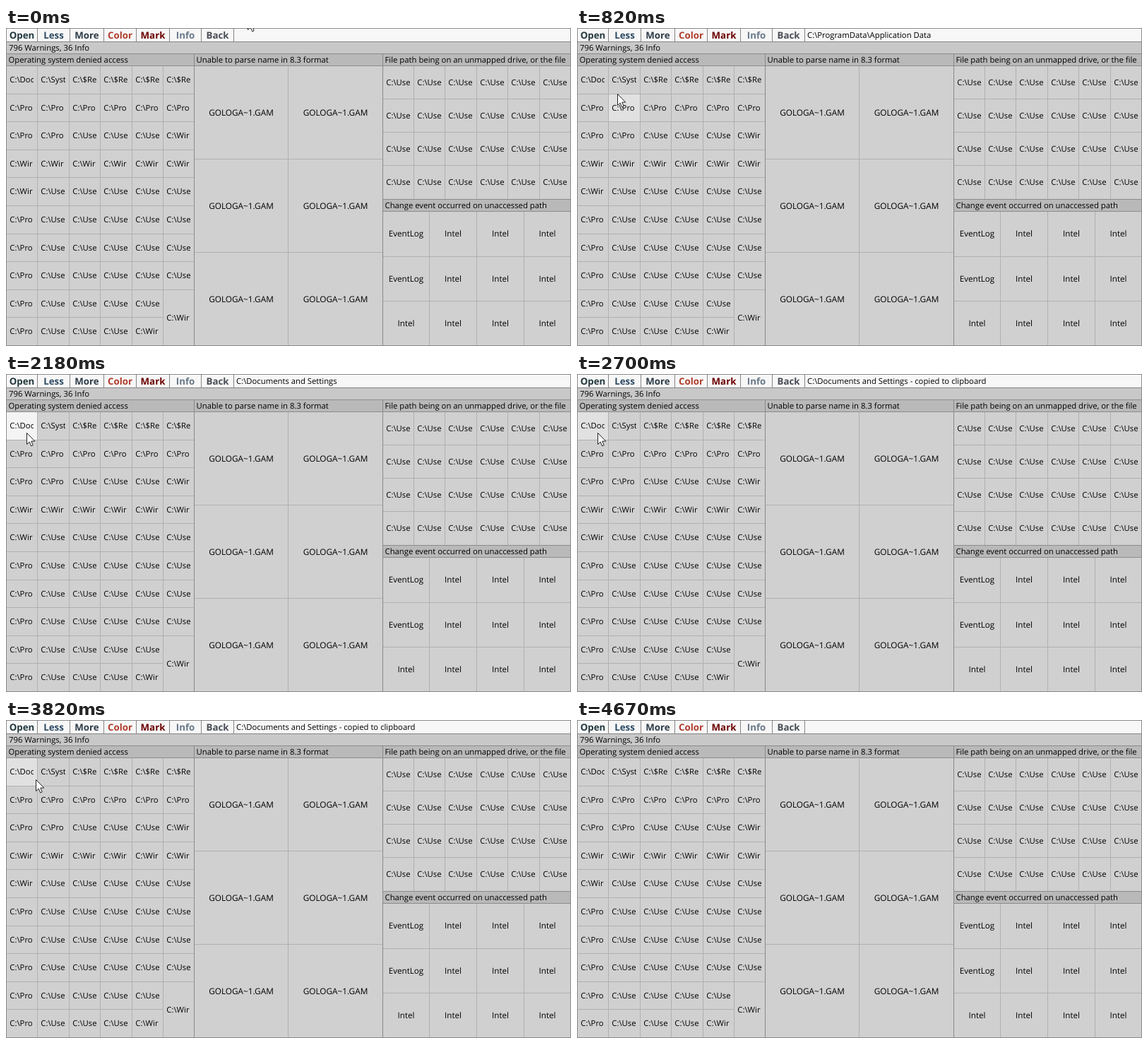
These frames come from a looping animation (800 px wide and 450 px high, 4730 ms). An HTML page:

```html
<!DOCTYPE html>
<html lang="en">
<head>
<meta charset="utf-8">
<title>Warnings map</title>
<style>
html, body { margin: 0; width: 100%; height: 100%; overflow: hidden; }
#stage {
  position: relative; width: 800px; height: 450px; overflow: hidden;
  background: #c8c8c8; color: #000;
  font: 11.3px "Open Sans", "Noto Sans", sans-serif;
  text-rendering: geometricPrecision; white-space: pre; cursor: none;
}
#stage div { position: absolute; box-sizing: border-box; overflow: hidden; }
#stage .frame { inset: 0; border: 1px solid #8a8a8a; }
.button, #status { background: #f7f7f7; }
.button { font-size: 13.3px; font-weight: 700; line-height: 18px; text-align: center; }
#status { left: 323px; top: 1px; width: 476px; height: 18px; padding-left: 3px; line-height: 19px; }
#bar { left: 0; top: 0; width: 800px; height: 20px; background: #858585; }
#count { left: 4px; top: 20px; line-height: 17px; }
.head { height: 18px; padding: 0 4px 0 3.5px; line-height: 17px; background: #b9b9b9; border: solid #8c8c8c; border-width: 1px 0; }
.head span { display: block; overflow: hidden; }
.panel { background: #b0b0b0; }
.cell { background: #d0d0d0; display: flex; align-items: center; justify-content: center; }
.cell.path span { position: absolute; left: 4.3px; right: 5px; overflow: hidden; }
.split { background: #8a8a8a; }
#arrow { position: absolute; left: 0; top: 0; overflow: visible; }
</style>
</head>
<body>
<div id="stage">
  <div id="bar"></div>
  <div id="status"></div>
  <div id="count">796 Warnings, 36 Info</div>
</div>
<script>
const LOOP = 4730, PRESS = 2100, RELEASE = 2350;
const stage = document.getElementById('stage');
const status = document.getElementById('status');

function box(cls, x, y, w, h, text, size) {
  const el = document.createElement('div');
  el.className = cls;
  Object.assign(el.style, { left: x + 'px', top: y + 'px', width: w + 'px', height: h + 'px' });
  if (size) el.style.fontSize = size + 'px';
  if (text) el.appendChild(document.createElement('span')).textContent = text;
  return stage.appendChild(el);
}

// Grid of cells separated by one-pixel lines; label returns [text, row span].
function panel(x0, y0, x1, y1, cols, rows, cls, size, label) {
  const px = c => Math.floor(x0 + (x1 - x0) * c / cols);
  const py = r => Math.floor(y0 + (y1 - y0) * r / rows);
  const cells = [];
  box('panel', px(0), py(0), px(cols) - px(0), py(rows) - py(0));
  for (let r = 0; r < rows; r++) for (let c = 0; c < cols; c++) {
    const [text, span = 1] = label(r, c);
    if (!text) continue;
    const x = px(c) + 1, y = py(r) + 1, right = px(c + 1), bottom = py(r + span);
    const el = box(cls, x, y, right - x, bottom - y, text, size);
    cells.push({ el, r, c, x, y, right, bottom });
  }
  return cells;
}

const head = (x, y, w, text) => box('head', x, y, w, 18, text);

// Toolbar
const edges = [0, 44, 90, 138, 184, 231, 276, 322];
[['Open', '#22383e'], ['Less', '#2c4a63'], ['More', '#2e3c48'], ['Color', '#b03c2c'],
 ['Mark', '#6c0000'], ['Info', '#687888'], ['Back', '#484c54']].forEach(([name, color], i) => {
  const el = box('button', edges[i] + 1, 1, edges[i + 1] - edges[i] - 1, 18, name);
  el.style.color = color;
});

// Panels
const names = { D: 'Doc', S: 'Syst', $: '$Re', P: 'Pro', U: 'Use', W: 'Wir' };
const map = ['DS$$$$', 'PPPPPP', 'PPUUUW', 'WWWWWW', 'WUUUUU',
             'PUUUUU', 'PUUUUU', 'PUUUUU', 'PUUUUW', 'PUUUW'];
const denied = panel(0.4, 53.4, 266.8, 449.4, 6, 10, 'cell path', 0, (r, c) => {
  const key = map[r][c];
  return key ? ['C:\\' + names[key], r === 8 && c === 5 ? 2 : 1] : [''];
});
panel(266, 53, 533, 449, 2, 3, 'cell', 11.8, () => ['GOLOGA~1.GAM']);
panel(533, 53.4, 799.4, 242, 6, 4, 'cell path', 0, () => ['C:\\Use']);
panel(533, 259.9, 799.9, 449.4, 4, 3, 'cell', 11.6, (r, c) => [c === 0 && r < 2 ? 'EventLog' : 'Intel']);

head(0, 36, 266, 'Operating system denied access');
head(266, 36, 267, 'Unable to parse name in 8.3 format');
head(533, 36, 266, 'File path being on an unmapped drive, or the file');
head(533, 242, 266, 'Change event occurred on unaccessed path');
[266, 533].forEach(x => box('split', x, 36, 1, 414));
box('frame', 0, 0, 800, 450);

// Full paths of the cells under the pointer's route
const bin = String.raw`C:\$Recycle.Bin\S-1-5-`;
const paths = {
  '0,0': String.raw`C:\Documents and Settings`,
  '0,1': String.raw`C:\System Volume Information`,
  '0,2': bin + '18',
  '0,3': bin + '21-177675549-1716711724-849948083-1001',
  '0,4': bin + '21-177675549-1716711724-849948083-1002',
  '1,1': String.raw`C:\ProgramData\Application Data`
};

stage.insertAdjacentHTML('beforeend',
  '<svg id="arrow" width="14" height="21"><path d="M.5.5V16.5L4.2 13.1 6.7 18.9 9.2 17.8 6.8 12.1H11.8Z" fill="#fff" stroke="#222"/></svg>');
const arrow = document.getElementById('arrow');

// Pointer route: time, x, y
const route = [
  [0, 342, -14], [60, 342, -14], [200, 290, 17], [450, 200.2, 62.2], [640, 125, 78],
  [820, 57.2, 93.6], [1000, 35, 86], [1120, 29.2, 83.2], [3650, 29.2, 83.2],
  [3850, 45, 85], [4090, 122.2, 90.2], [4390, 343, -24], [LOOP, 343, -24]
];

function pointer(t) {
  const i = route.findIndex(p => p[0] > t);
  const [t0, x0, y0] = route[i - 1], [t1, x1, y1] = route[i];
  const k = (t - t0) / (t1 - t0);
  return [x0 + (x1 - x0) * k, y0 + (y1 - y0) * k];
}

let lit = null;

function draw() {
  const t = performance.now() % LOOP;
  const [x, y] = pointer(t);
  arrow.style.transform = `translate(${Math.floor(x)}px, ${Math.floor(y)}px)`;

  const cell = denied.find(d => x >= d.x - 1 && x < d.right && y >= d.y - 1 && y < d.bottom);
  if (lit && lit !== cell) lit.el.style.background = '';
  let text = '';
  if (cell) {
    cell.el.style.background = t >= PRESS && t < RELEASE ? '#f4f4f4' : '#e1e1e1';
    text = paths[cell.r + ',' + cell.c] || '';
    if (cell === denied[0] && t >= RELEASE) text += ' - copied to clipboard';
  }
  lit = cell;
  if (status.textContent !== text) status.textContent = text;
  requestAnimationFrame(draw);
}
draw();
</script>
</body>
</html>
```
